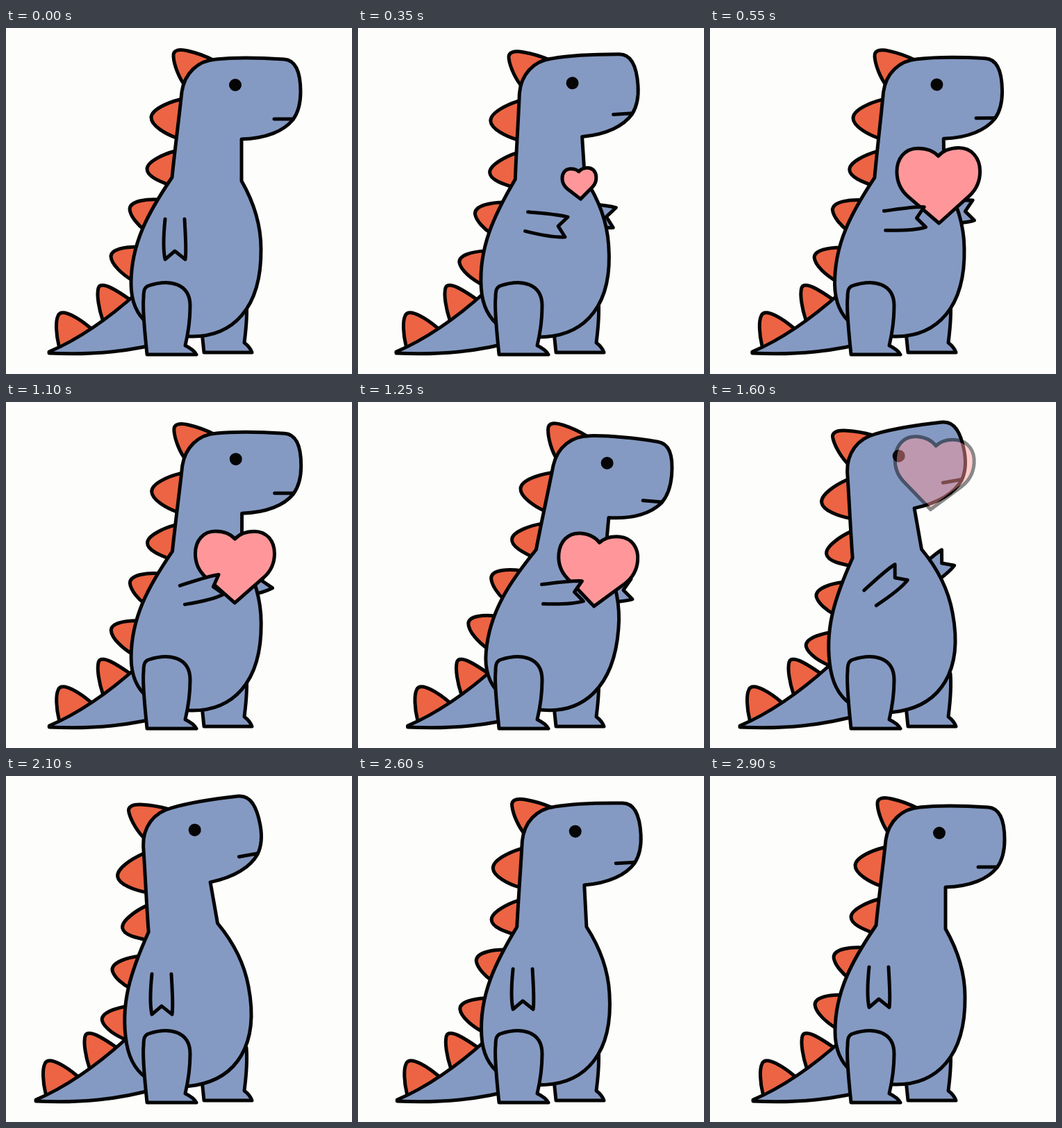
Animation, 498 px wide and 498 px high, one loop 2.95 s. Source, as an HTML page with a canvas:

```html
<!DOCTYPE html>
<html lang="en">
<head>
<meta charset="utf-8">
<title>Dinosaur tossing a heart</title>
<style>
  html, body { margin: 0; width: 100%; height: 100%; overflow: hidden; background: #fdfefc; }
  canvas { display: block; width: 498px; height: 498px; }
</style>
</head>
<body>
<canvas id="stage" width="498" height="498"></canvas>
<script>
const SIZE = 498, LOOP = 2950;
const BLUE = '#859ac3', RED = '#ec6443', PINK = '#ff979a', INK = '#050505', PAPER = '#fdfefc';
const PIVOT = { x: 276, y: 413 };
const TILT = -10 * Math.PI / 180;
const TOSS = 1275;

const ctx = document.getElementById('stage').getContext('2d');
const layer = document.createElement('canvas');
layer.width = layer.height = SIZE;
const heartCtx = layer.getContext('2d');

const body = new Path2D(`M339 220 L339 160 C375 159 400 148 413 132 C421 121 424 108 424 92
  C424 65 418 46 400 45 C370 43 330 42 302 45 C276 47 257 65 253 92 C249 130 243 175 239 215
  C205 265 180 310 180 368 C180 420 215 444 268 444 C325 444 368 405 367 318
  C367 280 355 248 339 220 Z`);

const backSpikes = [
  'M257 82 C250 73 242 55 241 41 C240 31 250 30 262 33 C275 36 288 41 298 46',
  'M250 103 C234 107 209 117 209 129 C209 141 231 153 245 158',
  'M244 177 C228 181 203 192 203 203 C203 214 222 221 240 228',
  'M220 247 C205 246 178 248 178 261 C179 271 190 284 200 291',
  'M188 315 C172 315 151 318 151 329 C152 341 168 355 183 364'
].map(d => new Path2D(d));

const tailSpikes = [
  'M139 420 C134 405 130 384 133 374 C137 363 160 378 180 392',
  'M76 457 C72 440 71 422 75 414 C80 401 108 420 123 433'
].map(d => new Path2D(d));

const tail = new Path2D('M62 466 C95 452 140 425 190 380 L240 449 C180 466 125 471 62 468 Z');
const farLeg = new Path2D('M282 438 L285 467 L354 467 C352 461 347 456 343 453 C345 437 348 415 346 391');
const nearLeg = new Path2D(`M203 470 C200 440 196 405 198 388 C198 376 200 373 205 371
  C235 361 265 367 265 400 C265 420 262 440 258 457 C264 460 271 464 274 470 Z`);
const arm = new Path2D('M0 14 C20 16 45 17 58 14 L46 0 L58 -15 C45 -17 20 -15 0 -14');

// Centred on the middle of the shape
const heart = new Path2D(`M0 -40 C-8 -49 -20 -51 -28 -51 C-46 -51 -57 -37 -57 -19
  C-57 -5 -52 6 -42 15 L0 52 L42 15 C52 6 57 -5 57 -19 C57 -37 46 -51 28 -51 C20 -51 8 -49 0 -40 Z`);

const leanKeys = [[100, 0], [320, .38], [630, 0], [1085, 0], [1250, -.5], [1515, 1], [2250, 1], [2800, 0]];
const armKeys = [[100, 90], [440, -4], [600, -4], [900, -15], [1200, -15], [1300, -3], [1400, -6],
  [1580, -29], [1740, -29], [2080, 100], [2250, 100], [2800, 90]];
const shoulderXKeys = [[100, 243], [440, 253], [1740, 254], [2080, 247], [2250, 247], [2800, 243]];
const shoulderYKeys = [[100, 275], [440, 277], [1250, 278], [1400, 279], [1580, 276], [1740, 276],
  [2080, 278], [2250, 278], [2800, 275]];
const popKeys = [[270, 0], [460, 1.1], [600, 1.03], [700, 1]];
const heartXKeys = [[550, 331], [900, 329]];
const heartYKeys = [[590, 227], [900, 237]];

// Smooth interpolation between [time, value] pairs
function at(keys, t) {
  if (t <= keys[0][0]) return keys[0][1];
  for (let i = 1; i < keys.length; i++) {
    const [t0, a] = keys[i - 1], [t1, b] = keys[i];
    if (t < t1) {
      const u = (t - t0) / (t1 - t0);
      return a + (b - a) * u * u * (3 - 2 * u);
    }
  }
  return keys[keys.length - 1][1];
}

function paint(c, path, fill) {
  c.fillStyle = fill;
  c.fill(path);
  c.stroke(path);
}

function pen(c) {
  c.lineWidth = 5;
  c.lineCap = c.lineJoin = 'round';
  c.strokeStyle = INK;
}

function leaning(lean, draw) {
  ctx.save();
  ctx.translate(PIVOT.x, PIVOT.y);
  ctx.rotate(TILT * lean);
  ctx.translate(-PIVOT.x, -PIVOT.y);
  draw();
  ctx.restore();
}

function drawArm(x, y, deg) {
  ctx.save();
  ctx.translate(x, y);
  ctx.rotate(deg * Math.PI / 180);
  paint(ctx, arm, BLUE);
  ctx.restore();
}

function drawHeldHeart(t) {
  const scale = at(popKeys, t);
  if (scale < .01) return;
  ctx.save();
  ctx.translate(at(heartXKeys, t), at(heartYKeys, t));
  ctx.scale(scale, scale);
  ctx.lineWidth = 5 / Math.max(scale, .3);
  paint(ctx, heart, PINK);
  ctx.restore();
}

function drawFlyingHeart(t) {
  const u = t - TOSS;
  const alpha = Math.min(1, 1 - (t - 1306) * .0018);
  if (alpha <= 0) return;
  heartCtx.clearRect(0, 0, SIZE, SIZE);
  heartCtx.save();
  heartCtx.translate(339 - u * .053, 239 - .00128 * u * u);
  heartCtx.rotate((7 - u * .007) * Math.PI / 180);
  paint(heartCtx, heart, PINK);
  heartCtx.restore();
  ctx.globalAlpha = alpha;
  ctx.drawImage(layer, 0, 0);
  ctx.globalAlpha = 1;
}

function drawFace() {
  ctx.fillStyle = INK;
  ctx.beginPath();
  ctx.arc(330, 82, 9, 0, Math.PI * 2);
  ctx.fill();
  ctx.beginPath();
  ctx.moveTo(386, 131);
  ctx.lineTo(413, 131);
  ctx.stroke();
}

function render(t) {
  const lean = at(leanKeys, t);
  const angle = at(armKeys, t);
  const sx = at(shoulderXKeys, t);
  const sy = at(shoulderYKeys, t);

  ctx.fillStyle = PAPER;
  ctx.fillRect(0, 0, SIZE, SIZE);

  ctx.save();
  ctx.translate(-19 * lean, 0);
  tailSpikes.forEach(s => paint(ctx, s, RED));
  paint(ctx, tail, BLUE);
  ctx.restore();

  paint(ctx, farLeg, BLUE);
  leaning(lean, () => {
    backSpikes.forEach(s => paint(ctx, s, RED));
    drawArm(sx + 70, sy - 9, angle);
    paint(ctx, body, BLUE);
    drawFace();
  });
  paint(ctx, nearLeg, BLUE);

  leaning(lean, () => {
    if (t < TOSS) drawHeldHeart(t);
    drawArm(sx, sy, angle);
  });
  if (t >= TOSS) drawFlyingHeart(t);
}

pen(ctx);
pen(heartCtx);
const start = performance.now();

function tick() {
  render((performance.now() - start) % LOOP);
  requestAnimationFrame(tick);
}
tick();
</script>
</body>
</html>
```
